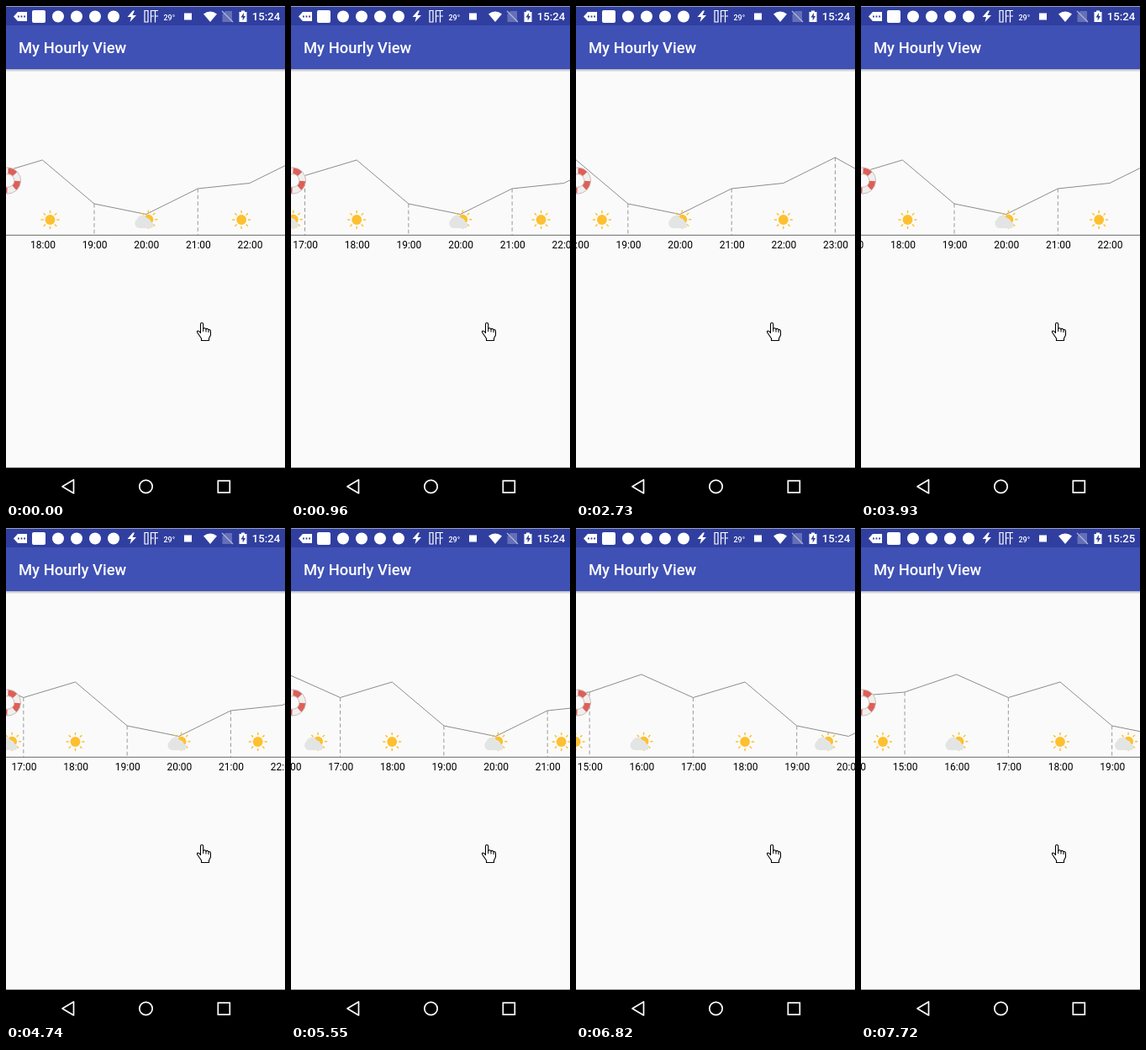
These frames come from a looping animation (332 px wide and 587 px high, 8000 ms). An HTML page:

```html
<!DOCTYPE html>
<html lang="en">
<head>
<meta charset="utf-8">
<title>Hourly chart</title>
<style>
  html, body { margin: 0; width: 100%; height: 100%; overflow: hidden; background: #fafafa; }
  svg { display: block; width: 100%; height: 100%; }
  text { font-family: Roboto, sans-serif; }
  .label { font-size: 12px; text-anchor: middle; }
  .line { fill: none; stroke: #8c8c8c; }
  .dashes { fill: none; stroke: #999; stroke-dasharray: 4.6 3.1; }
</style>
</head>
<body>
<svg viewBox="0 0 332 587">
  <defs>
    <linearGradient id="shadow" x2="0" y2="1">
      <stop stop-color="#b8b8b8"/><stop offset="1" stop-color="#fafafa"/>
    </linearGradient>
    <g id="sun" stroke="#fdc02f" stroke-width="1.5">
      <circle r="5.9" fill="#fdc02f" stroke="none"/>
      <g id="rays"></g>
    </g>
    <g id="cloudy">
      <use href="#sun" x="2.8" y="-.3"/>
      <path fill="#e3e5e5" d="M-8 10A5.8 5.8 0 0 1 -10.8 -.5A6.5 6.5 0 0 1 1 -2A6.5 6.5 0 0 1 6 2.6A3.9 3.9 0 0 1 6.5 10Z"/>
    </g>
  </defs>

  <rect width="332" height="587" fill="#fafafa"/>

  <!-- Chart -->
  <g id="chart"></g>
  <path d="M0 272.3H332" stroke="#858585" stroke-width="1.2"/>
  <g id="icons"></g>

  <!-- Life ring -->
  <g transform="translate(2 207.5) rotate(-20)" fill="none">
    <circle r="11.7" stroke="#f1efed" stroke-width="7.8"/>
    <circle r="11.7" stroke="#de5f58" stroke-width="7" pathLength="8" stroke-dasharray="1" stroke-dashoffset="-.5"/>
    <circle r="15.6" stroke="#c2b6b2" stroke-width=".8"/>
    <circle r="7.8" stroke="#c2b6b2" stroke-width=".8"/>
  </g>

  <!-- App bar -->
  <rect y="75" width="332" height="3.5" fill="url(#shadow)"/>
  <rect width="332" height="75" fill="#3f51b5"/>
  <rect width="332" height="23" fill="#303f9f"/>
  <rect width="332" height="1" fill="#9a9fb8"/>
  <text x="15" y="56" font-size="18.4" font-weight="500" fill="#fff">My Hourly View</text>

  <!-- Status bar -->
  <g fill="#fff">
    <path d="M9 12.5L14 7H25V18H14Z"/>
    <path d="M14 12.5H23" stroke="#303f9f" stroke-width="1.8" stroke-dasharray="1.8"/>
    <rect x="31" y="5" width="16" height="15" rx="2"/>
    <circle cx="62" cy="12.5" r="7"/><circle cx="84" cy="12.5" r="7"/>
    <circle cx="106" cy="12.5" r="7"/><circle cx="128" cy="12.5" r="7"/>
    <path d="M151 5.5L144.5 13H149L147.5 19L155 11H150.5L153 5.5Z"/>
    <path d="M165 5.5H169V19H165ZM172.5 19.5V5.5H181M172.5 12H176M177.5 19.5V5.5M177.5 12H181" fill="none" stroke="#fff" stroke-width="1.2"/>
    <text x="187.5" y="16.5" font-size="9" font-weight="500">29°</text>
    <rect x="212" y="8.5" width="9" height="8"/>
    <path d="M235 9.5Q243 3.5 251 9.5L243 19Z"/>
    <path d="M261 6H269V19H257.5V10Z" opacity=".25"/>
    <path d="M257 6L270 19" stroke="#aeb5d9" stroke-width="1.2"/>
    <path d="M277.5 7H280V5.5H284V7H286.5V19H277.5Z"/>
    <path d="M283 8L279.5 13.5H281.7V17.5L285 12H282.8Z" fill="#303f9f"/>
    <text id="clock" x="292.7" y="17" font-size="13.2" font-weight="500"></text>
  </g>

  <!-- Navigation bar -->
  <rect y="548.6" width="332" height="39"/>
  <g fill="none" stroke="#fff" stroke-width="1.7">
    <path d="M67 571L80.5 563V579Z" stroke-linejoin="round"/>
    <circle cx="166.5" cy="571" r="7.7"/>
    <rect x="252.3" y="564.2" width="14" height="14"/>
  </g>

  <!-- Pointer -->
  <path fill="#fff" stroke="#000" stroke-width="1.1" stroke-linejoin="round"
    d="M231.5 378Q231.5 376.5 233 376.5Q234.7 376.5 234.7 378V383.5Q236.5 381.8 238 384Q239.8 382.5 241 384.7Q243.5 383.8 243.5 387V391L241.5 395V397.5H232.5V395L228 388.5Q226.7 386 228.5 386Q230 386 231.5 388.5Z"/>
  <path d="M234.7 383.5V387M238 384V387.5M241 385V388" stroke="#000" fill="none"/>
</svg>

<script>
const WIDTH = 332, STEP = 61.65, BASE = 272, FIRST_HOUR = 14, ICON_HALF = 16.5;
const heights = [200, 195, 174, 201.5, 183, 235, 247.5, 217, 210.5, 180, 214.5];
const bands = [[13, 'sun'], [15, 'cloudy'], [17, 'sun'], [19, 'cloudy'], [21, 'sun']];

// Scroll positions: [time in ms, x of 18:00]
const scroll = [[0, 43.3], [1150, 80], [1920, 63], [2730, 0.2], [3930, 49.3],
                [5550, 120.2], [6820, 201], [7720, 237]];
const LOOP = 8000, MINUTE_CHANGE = 7270;

const byId = id => document.getElementById(id);
const chart = byId('chart'), icons = byId('icons'), clock = byId('clock');

function add(parent, tag, attributes, text = '') {
  const node = document.createElementNS('http://www.w3.org/2000/svg', tag);
  for (const name in attributes) node.setAttribute(name, attributes[name]);
  node.textContent = text;
  return parent.appendChild(node);
}

for (let angle = 0; angle < 360; angle += 45)
  add(byId('rays'), 'path', { d: 'M7.8 0H11', transform: `rotate(${angle})` });

const hourX = hour => (hour - 18) * STEP;
const points = heights.map((y, i) => [hourX(FIRST_HOUR + i), y]);
add(chart, 'polyline', { class: 'line', points: points.join(' ') });
points.forEach(([x, y], i) => {
  const hour = FIRST_HOUR + i;
  if (hour % 2) add(chart, 'path', { class: 'dashes', d: `M${x} ${y}V${BASE}` });
  add(chart, 'text', { class: 'label', x: x + 0.6, y: 288 }, `${hour % 24}`.padStart(2, '0') + ':00');
});
const bandIcons = bands.map(([, shape]) => add(icons, 'use', { href: '#' + shape }));

const slope = i => (scroll[i + 1][1] - scroll[i][1]) / (scroll[i + 1][0] - scroll[i][0]);

function tangent(i) {
  if (i === 0) return slope(0);
  if (i === scroll.length - 1) return slope(i - 1);
  const before = slope(i - 1), after = slope(i);
  return before * after <= 0 ? 0 : (before + after) / 2;
}

function scrollAt(time) {
  const last = scroll.length - 1;
  if (time >= scroll[last][0]) return scroll[last][1];
  const i = scroll.findIndex(([end]) => time < end) - 1;
  const [t0, x0] = scroll[i], [t1, x1] = scroll[i + 1];
  const span = t1 - t0, u = (time - t0) / span, v = 1 - u;
  return v * v * (1 + 2 * u) * x0 + u * u * (1 + 2 * v) * x1
       + u * v * span * (v * tangent(i) - u * tangent(i + 1));
}

// Icons stay centred in the visible part of their two-hour band.
function iconX(left, right) {
  const middle = (Math.max(left, 0) + Math.min(right, WIDTH)) / 2;
  return Math.min(Math.max(middle, left + ICON_HALF), right - ICON_HALF);
}

function draw(now) {
  const time = now % LOOP, offset = scrollAt(time);
  chart.setAttribute('transform', `translate(${offset})`);
  bands.forEach(([hour], i) => {
    const left = offset + hourX(hour);
    bandIcons[i].setAttribute('transform', `translate(${iconX(left, left + 2 * STEP)} 254)`);
  });
  clock.textContent = time < MINUTE_CHANGE ? '15:24' : '15:25';
}

const start = performance.now();
function tick() {
  draw(performance.now() - start);
  requestAnimationFrame(tick);
}
tick();
</script>
</body>
</html>
```
